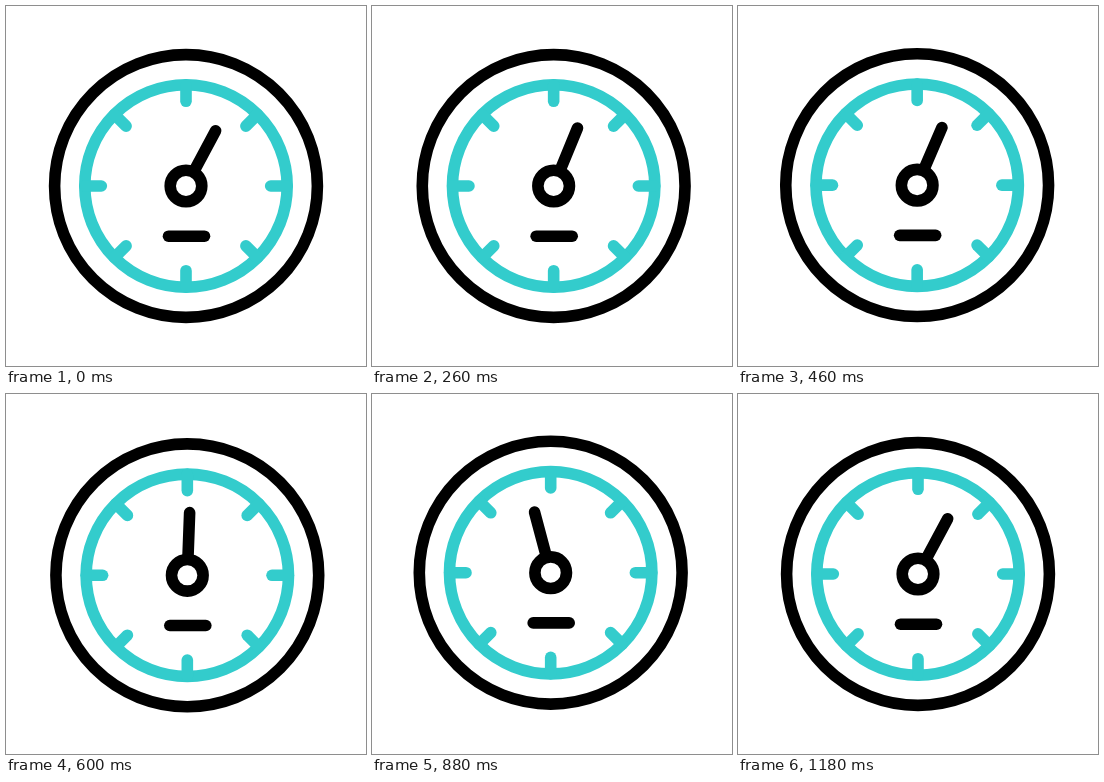
Recreate the animation shown at these times as an HTML page. Size 360 by 360 pixels, loop 1200 ms.

```html
<!DOCTYPE html>
<html lang="en">
<head>
<meta charset="utf-8">
<title>Gauge</title>
<style>
  html, body { margin: 0; width: 100%; height: 100%; overflow: hidden; background: #fff; }
  svg { display: block; width: 100vw; height: 100vh; }
  g { fill: none; stroke-linecap: round; stroke-width: 11.6; }
  .dark { stroke: #000; }
  .teal { stroke: #33cccc; }
</style>
</head>
<body>
<svg viewBox="0 0 360 360">
  <g id="gauge">
    <g class="teal" id="dial"><circle cx="180" cy="180" r="101.2"/></g>
    <g class="dark">
      <circle cx="180" cy="180" r="131.4"/>
      <path d="M162.5 230.2H198.5"/>
      <path id="needle" d="M180 162V117.3"/>
      <circle cx="180" cy="180" r="15.8"/>
    </g>
  </g>
</svg>
<script>
const LOOP = 1200, SHAKE = 400;
const $ = id => document.getElementById(id);

for (let i = 0; i < 8; i++) {
  const mark = document.createElementNS("http://www.w3.org/2000/svg", "path");
  mark.setAttribute("d", "M180 79V95.3");
  mark.setAttribute("transform", `rotate(${i * 45} 180 180)`);
  $("dial").append(mark);
}

// Turning points as [ms, value]; a half cosine joins each pair.
const jolt = [[0, 0], [140, -2.1], [240, 3], [310, -3.5], [370, 0], [SHAKE, 0]];
const swing = [[0, 28.2], [180, 17.5], [360, 29], [820, -21], [1090, 29], [LOOP, 28.2]];

function glide(points, t) {
  const i = points.findIndex(([at]) => at > t);
  const [t0, v0] = points[i - 1], [t1, v1] = points[i];
  const k = (t - t0) / (t1 - t0);
  return v0 + (v1 - v0) * (1 - Math.cos(Math.PI * k)) / 2;
}

function draw(now) {
  const t = now % LOOP, phase = t % SHAKE;
  const dx = glide(jolt, phase);
  const dy = phase < 0.6 * SHAKE ? dx : 0; // diagonal first, then sideways only
  $("gauge").setAttribute("transform", `translate(${dx} ${dy})`);
  $("needle").setAttribute("transform", `rotate(${glide(swing, t)} 180 180)`);
}

const start = performance.now();
function loop() {
  draw(performance.now() - start);
  requestAnimationFrame(loop);
}
loop();
</script>
</body>
</html>
```
